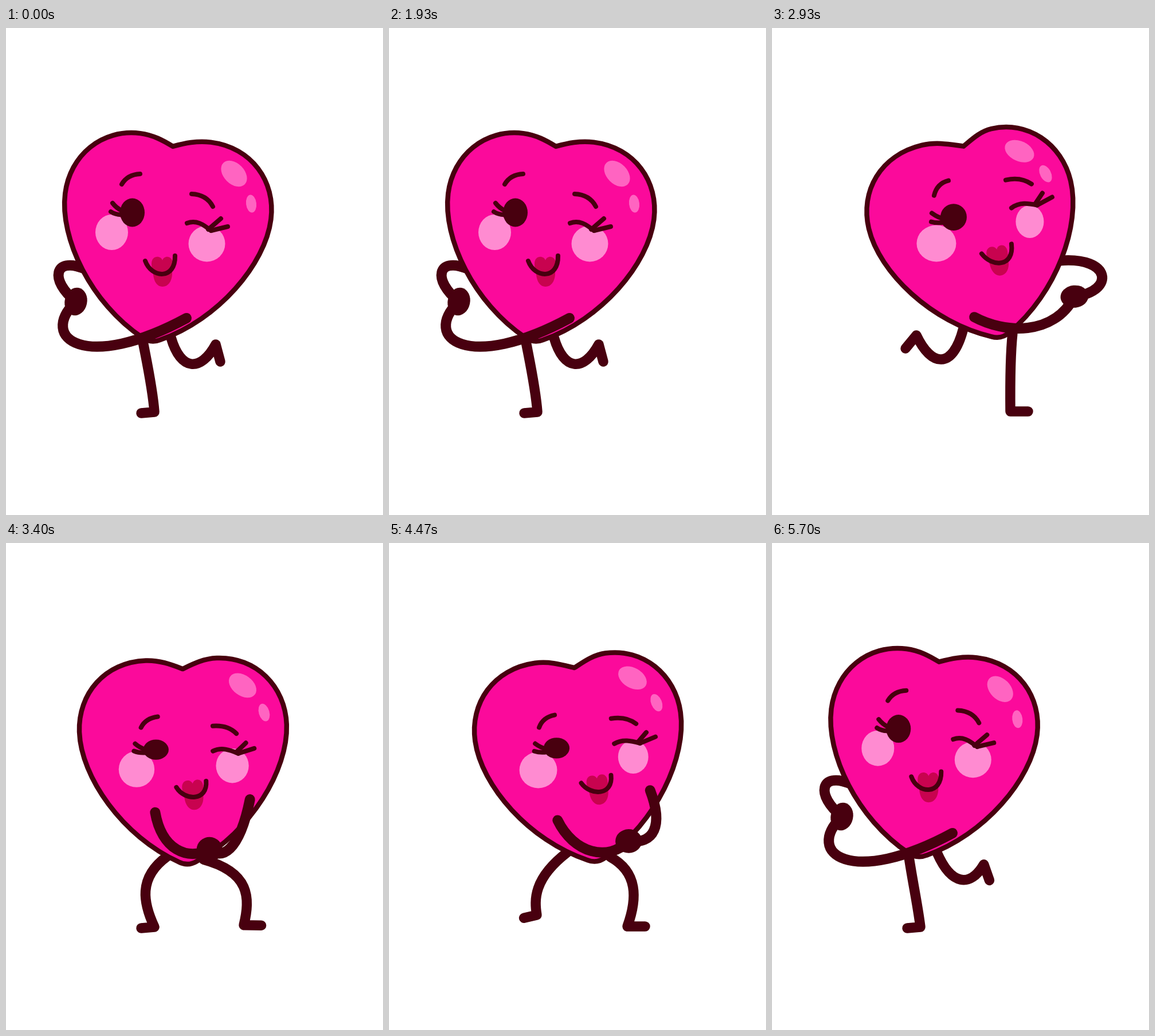
Recreate the animation shown at these times as an HTML page with a canvas. Size 658x851 px, loop 5.73 s.

```html
<!DOCTYPE html>
<html lang="en">
<head>
<meta charset="utf-8">
<title>Dancing heart</title>
<style>
  html, body { margin: 0; width: 100%; height: 100%; overflow: hidden; background: #fff; }
  canvas { display: block; }
</style>
</head>
<body>
<canvas id="stage" width="658" height="851"></canvas>
<script>
const ctx = document.getElementById('stage').getContext('2d');
const LOOP = 5730, HALF = 24, CYCLE = 2 * HALF;
const DARK = '#48000f', PINK = '#fb0a9b', CHEEK = '#ff8bd1', SHINE = '#ff64c1', LIP = '#c8034f';

// The two end poses of the dance; cleft is the sideways place of the notch
const LEFT = { x: 296, y: 207.5, rot: 7.2, cleft: -4.8 };
const RIGHT = { x: 321, y: 206.5, rot: -13.3, cleft: 13 };

// Arms: shoulder, two curve handles, hand
const ARM_A = {
  left: { clasp: [315, 507, 140, 602, 55, 543, 122, 478], reach: [298, 502, 215, 555, 110, 545, 89, 452] },
  right: { clasp: [505, 406, 598, 398, 605, 462, 522, 477], reach: [495, 408, 505, 415, 525, 430, 545, 447] }
};
const ARM_B = {
  left: { clasp: [135, 420, 85, 400, 75, 440, 122, 478], reach: [125, 412, 115, 420, 105, 435, 89, 452] },
  right: { clasp: [350, 507, 405, 533, 490, 540, 522, 477], reach: [362, 500, 410, 540, 510, 525, 545, 447] }
};

// Legs: hip in both end poses, then two curve handles, ankle and toe
const LEG_L = {
  hip: [[238, 543], [334, 525]], out: -1,
  stand: [246, 585, 256, 630, 259, 671, 236, 673], kick: [315, 598, 278, 592, 252, 537, 233, 560]
};
const LEG_R = {
  hip: [[288, 541], [420, 533]], out: 1,
  stand: [415, 575, 415, 620, 416, 670, 447, 670], kick: [305, 600, 340, 601, 366, 553, 374, 583]
};

const rad = d => d * Math.PI / 180;
const mix = (a, b, u) => a + (b - a) * u;
const blend = (a, b, u) => a.map((v, i) => mix(v, b[i], u));
const pairs = a => Array.from({ length: a.length / 2 }, (_, i) => a.slice(2 * i, 2 * i + 2));

function smooth(from, to, v) {
  const t = Math.min(1, Math.max(0, (v - from) / (to - from)));
  return t * t * (3 - 2 * t);
}

// 0 on the left, 1 on the right; every half cycle crosses over once
function swing(step, from, to) {
  const e = smooth(from, to, step % HALF);
  return step < HALF ? e : 1 - e;
}

let pose, u, dip, nod;

function setPose(step) {
  u = swing(step, 5, 20);
  dip = Math.sin(Math.PI * step / HALF) ** 2;
  nod = 2 * dip;
  pose = {
    x: mix(LEFT.x, RIGHT.x, swing(step, 4, 19)) + 4 * dip * (1 - 2 * u),
    y: mix(LEFT.y, RIGHT.y, u) + 12 * dip,
    rot: mix(LEFT.rot, RIGHT.rot, u),
    cleft: mix(LEFT.cleft, RIGHT.cleft, u)
  };
}

function toLocal(p, x, y) {
  const c = Math.cos(rad(p.rot)), s = Math.sin(rad(p.rot)), dx = x - p.x, dy = y - p.y;
  return [c * dx + s * dy, c * dy - s * dx];
}

// Blends stage points of the end poses in body space; the face nods most at the brows
function place(l, r, nods = true) {
  const [x, y] = blend(toLocal(LEFT, l[0], l[1]), toLocal(RIGHT, r[0], r[1]), u);
  const c = Math.cos(rad(pose.rot)), s = Math.sin(rad(pose.rot));
  const drop = nods ? nod * .07 * (260 - y) : 0;
  return [pose.x + c * x - s * y, pose.y + s * x + c * y + drop];
}

function trace([start, ...rest]) {
  const draw = [, 'lineTo', 'quadraticCurveTo', 'bezierCurveTo'][rest.length];
  ctx.beginPath();
  ctx.moveTo(...start);
  ctx[draw](...rest.flat());
}

function ink(width) {
  ctx.lineWidth = width;
  ctx.strokeStyle = DARK;
  ctx.stroke();
}

function line(l, r) {
  const ends = pairs(r);
  trace(pairs(l).map((p, i) => place(p, ends[i])));
  ink(8);
}

function oval(x, y, rx, ry, angle, color) {
  ctx.beginPath();
  ctx.ellipse(x, y, rx, ry, rad(angle), 0, Math.PI * 2);
  ctx.fillStyle = color;
  ctx.fill();
}

// l and r: x, y, rx, ry
function spot(l, r, color, { angle = 0, squash = 0, nods = true } = {}) {
  const [x, y] = place(l, r, nods);
  const [, , rx, ry] = blend(l, r, u);
  oval(x, y, rx, ry * (1 - squash * nod), angle, color);
}

function heart() {
  const cx = pose.cleft, cy = 3 * u, top = -15.5, wide = 181;
  const lobe = side => side * 62 + cx * .4;
  const toward = (side, f) => mix(cx, lobe(side), f);
  ctx.save();
  ctx.translate(pose.x, pose.y);
  ctx.rotate(rad(pose.rot));
  ctx.beginPath();
  ctx.moveTo(cx, cy);
  ctx.bezierCurveTo(toward(1, .3), cy - 8, toward(1, .62), top, lobe(1), top);
  ctx.bezierCurveTo(132, top, wide, 38, wide, 105);
  ctx.bezierCurveTo(wide, 184, 112, 290, 16, 338);
  ctx.quadraticCurveTo(0, 347, -16, 338);
  ctx.bezierCurveTo(-112, 290, -wide, 184, -wide, 105);
  ctx.bezierCurveTo(-wide, 38, -132, top, lobe(-1), top);
  ctx.bezierCurveTo(toward(-1, .62), top, toward(-1, .3), cy - 8, cx, cy);
  ctx.closePath();
  ctx.fillStyle = PINK;
  ctx.fill();
  ink(8.5);
  ctx.restore();
}

function lips() {
  ctx.save();
  ctx.translate(...place([273, 426], [395.5, 406.5]));
  ctx.rotate(rad(-9 * u));
  ctx.beginPath();
  ctx.moveTo(0, -20);
  ctx.bezierCurveTo(-3, -29, -19, -29, -19, -14);
  ctx.bezierCurveTo(-19, -4, -16, 0, -16, 5);
  ctx.bezierCurveTo(-15, 17, -9, 26, 0, 26);
  ctx.bezierCurveTo(10, 26, 16, 17, 17, 5);
  ctx.bezierCurveTo(17, 0, 18, -5, 18, -15);
  ctx.bezierCurveTo(17, -29, 3, -29, 0, -20);
  ctx.fillStyle = LIP;
  ctx.fill();
  ctx.restore();
}

function face() {
  spot([398, 254.5, 26.5, 18], [432, 215, 27, 17.5], SHINE, { angle: pose.rot + 38, nods: false });
  spot([428, 307, 9, 15.5], [477.5, 254.5, 9.5, 16], SHINE, { angle: pose.rot - 14, nods: false });
  spot([184.5, 357, 28.5, 31], [287, 376, 34.5, 32], CHEEK);
  spot([350.5, 377, 32, 31.5], [450, 338, 24.5, 28.5], CHEEK);
  // brows
  line([202, 273, 212, 256, 234, 255], [283, 292, 288, 271, 308, 266]);
  line([324, 290, 350, 291, 361, 312], [408, 265, 434, 259, 453, 272]);
  // open eye
  line([186, 306, 192, 314, 203, 320], [279, 323, 290, 331, 300, 333]);
  line([183, 321, 192, 327, 204, 326], [278, 338, 288, 341, 300, 339]);
  spot([220.5, 322.5, 21.5, 25], [317, 330, 23, 23.5], DARK, { squash: .14 });
  // wink
  line([316, 341, 332, 335, 344, 343, 358, 354], [418, 314, 432, 303, 448, 306, 463, 309]);
  line([353, 352, 375, 333], [460, 306, 472, 288]);
  line([358, 354, 387, 347], [463, 309, 489, 295]);
  lips();
  line([243, 407, 254, 438, 296, 440, 295, 398], [366, 394, 384, 418, 423, 418, 418, 377]);
}

// A leg stands, kicks up slowly behind the body, then drops fast
function lift(step) {
  if (step < HALF) return smooth(HALF / 2, HALF, step);
  return 1 - Math.min(1, (step - HALF) / 9) ** 5;
}

function leg({ hip, out, stand, kick }, step) {
  const up = lift(out < 0 ? step : (step + HALF) % CYCLE);
  const load = out < 0 ? 1 - u : u;
  const [c1, c2, ankle, toe] = pairs(blend(stand, kick, up));
  const bow = out * 30 * dip * load * (1 - up);
  trace([place(...hip, false), [c1[0] + bow, c1[1]], [c2[0] + bow, c2[1]], ankle]);
  ctx.lineTo(...toe);
  ink(17.5);
}

// Hands reach out first, elbows follow; the crossing hangs in a low arc
function armPoints(arm, step, side) {
  const reach = Math.max(0, Math.sin(Math.PI * (step % HALF) / 12));
  const sag = 60 * Math.sin(Math.PI * side);
  const shape = ({ clasp, reach: open }) => clasp.map((v, i) =>
    mix(v, open[i], i > 1 && i < 6 ? reach ** 2 : reach));
  return pairs(blend(shape(arm.left), shape(arm.right), side))
    .map(([x, y], i) => [x, i ? y + sag : y]);
}

function limb(pts) {
  trace(pts);
  ink(18);
}

function draw(step) {
  setPose(step);
  const side = swing(step, 9, 18);
  const a = armPoints(ARM_A, step, side), b = armPoints(ARM_B, step, side);
  const frontA = side < .8, frontB = side > .2;

  ctx.fillStyle = '#fff';
  ctx.fillRect(0, 0, 658, 851);
  ctx.lineCap = ctx.lineJoin = 'round';
  leg(LEG_L, step);
  leg(LEG_R, step);
  if (!frontA) limb(a);
  if (!frontB) limb(b);
  heart();
  face();
  if (frontA) limb(a);
  if (frontB) limb(b);
  oval(...a[3], mix(19.5, 24.5, side), mix(24.5, 19.5, side), mix(12, -6, side), DARK);
}

// Drawn at 25 steps a second, shown on a 30 Hz grid
function tick() {
  const slot = Math.floor((performance.now() % LOOP + 4) * .03);
  draw(Math.floor(slot * 5 / 6) % CYCLE);
  requestAnimationFrame(tick);
}
tick();
</script>
</body>
</html>
```
